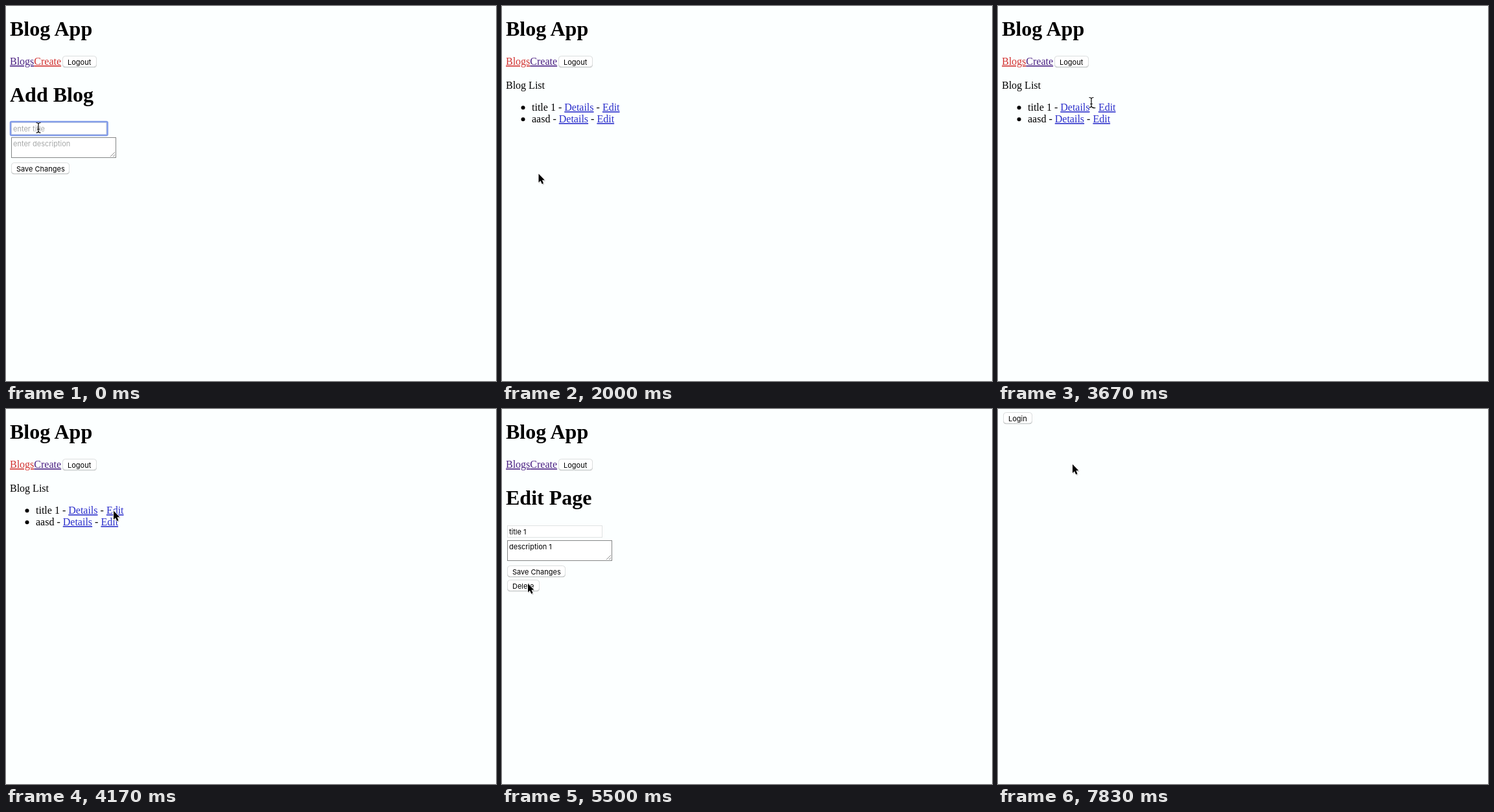
Recreate the animation shown at these times as an HTML page. Size 756 by 580 pixels, loop 8 s.

```html
<!DOCTYPE html>
<html lang="en">
<head>
<meta charset="utf-8">
<title>Blog App</title>
<style>
  html, body { margin: 0; width: 100%; height: 100%; overflow: hidden; background: #fcffff; }
  svg { display: block; width: 756px; height: 580px; }
  text { font: 16px "Liberation Serif", Times, serif; fill: #000; white-space: pre; }
  .h1 { font-size: 32px; font-weight: bold; }
  .ui { font: 11px Inter, sans-serif; }
  .hint { fill: #a6a8a8; }
  .link { text-decoration: underline; }
  .visited { fill: #4b2183; }
  .active { fill: #d23230; }
  .fresh { fill: #2b2fcb; }
  .field { fill: #fff; stroke: #dfe2e2; }
  .area { fill: #fff; stroke: #858787; }
  .ring { fill: none; stroke: #829be8; stroke-width: 2.6; }
  .thin { fill: none; stroke: #777; stroke-width: .8; }
</style>
</head>
<body>
<svg id="stage" viewBox="0 0 756 580"></svg>
<script>
const LOOP = 8000, STEP = 1000 / 6;
const stage = document.getElementById('stage');

const text = (x, y, s, cls = '') => `<text x="${x}" y="${y}" class="${cls}">${s}</text>`;
const rect = (x, y, w, h, cls, r = 0) =>
  `<rect x="${x}" y="${y}" width="${w}" height="${h}" rx="${r}" class="${cls}"/>`;
const span = (s, cls) => `<tspan class="link ${cls}">${s}</tspan>`;

function button(x, y, w, label) {
  return `<rect x="${x}" y="${y + .8}" width="${w}" height="17.4" rx="4.5" fill="#b9bcbc"/>
    <rect x="${x + .5}" y="${y + .5}" width="${w - 1}" height="16.6" rx="4" fill="#fff" stroke="#dcdfdf"/>` +
    text(x + 8, y + 14, label, 'ui');
}

function header(tab) {
  const tone = name => name === tab ? 'active' : 'visited';
  return text(6, 46, 'Blog App', 'h1') +
    text(6, 91, span('Blogs', tone('blogs')) + span('Create', tone('create'))) +
    button(87, 77, 53, 'Logout');
}

const caret = (x, y) => `<path d="M${x} ${y}v12" stroke="#000"/>`;

function form(heading, title, body, focus) {
  let s = text(6, 148, heading, 'h1') +
    rect(8.5, 180.5, 146, 18, 'field') +
    rect(8.5, 203.5, 161, 31, 'area') +
    '<path class="thin" d="M161 233l7-7M165 233l3-3"/>' +
    text(11, 194, title || 'enter title', title ? 'ui' : 'ui hint') +
    text(11, 217, body || 'enter description', body ? 'ui' : 'ui hint') +
    button(8, 242, 90, 'Save Changes');
  if (focus === 'title') s += rect(7, 179, 149.5, 21, 'ring', 1.5);
  if (focus === 'body') s += rect(7, 202, 164, 34, 'ring', 1.5);
  return s;
}

function addPage(n) {
  const title = 'aasd'.slice(0, n), body = 'asd'.slice(0, Math.max(0, n - 5));
  const inTitle = n < 5;
  let s = header('create') + form('Add Blog', title, body, inTitle ? 'title' : 'body');
  const widths = { a: 6.2, s: 5.8, d: 6.8 };
  const end = [...(inTitle ? title : body)].reduce((x, c) => x + widths[c], 11.7);
  if (n > 0) s += caret(end, inTitle ? 184 : 207);
  if (!inTitle) s += '<path d="M11 196.5h25" stroke="#c4625c" stroke-dasharray="1.2 1.2"/>';
  return s;
}

const editPage = () =>
  header() + form('Edit Page', 'title 1', 'description 1') + button(8, 264, 50, 'Delete');

const listPage = items => header('blogs') + text(6, 128, 'Blog List') +
  items.map((name, i) => `<circle cx="32.5" cy="${157.3 + 18 * i}" r="3"/>` +
    text(46, 162 + 18 * i, `${name} - ${span('Details', 'fresh')} - ${span('Edit', 'fresh')}`)).join('');

const loginPage = () => button(8, 5, 45, 'Login');

// [first step, page]
const pages = [
  [0, addPage],
  [12, () => listPage(['title 1', 'aasd'])],
  [26, editPage],
  [34, () => listPage(['title 1', 'aasd'])],
  [35, () => listPage(['aasd'])],
  [43, loginPage]
];

// [step, x, y, shape until the next entry]
const path = [
  [0, 50, 188, 'beam'], [1, 50, 188, ''],
  [9, 52, 216, 'beam'], [10, 58, 246, 'arrow'], [11, 56, 258, 'arrow'],
  [13, 57, 261, 'arrow'], [14, 60, 256, 'arrow'], [15, 70, 215, 'arrow'],
  [16, 84, 160, 'beam'], [22, 144, 149, 'beam'],
  [23, 184, 160, 'arrow'], [24, 167, 157, 'arrow'], [26, 165, 158, 'arrow'],
  [27, 120, 200, 'arrow'], [28, 64, 246, 'arrow'], [29, 55, 252.5, 'arrow'],
  [31, 52, 275, 'arrow'], [33, 40, 270, 'arrow'], [36, 42, 266, 'arrow'],
  [37, 70, 170, 'arrow'], [38, 99, 75.5, 'arrow'], [41, 115, 85.5, 'arrow']
];

const shapes = {
  '': '',
  beam: `<path d="M-3.5-7.5Q0-7.5 0-5V5.5Q0 8-3.5 8M3.5-7.5Q0-7.5 0-5V5.5Q0 8 3.5 8M-1.8 2.5H1.8"
    fill="none" stroke="#000" stroke-width="1.2"/>`,
  arrow: `<path d="M1 1.5V15l3-2.6L6 17.5l2.8-1-2.2-5.1h4.2Z" fill="#000" opacity=".22"/>
    <path d="M0 0V13.5L3 10.8L5.2 15.8L7.6 14.8L5.4 9.8H9.4Z" fill="#000" stroke="#fff"
      stroke-width="1.6" paint-order="stroke"/>`
};

const latest = (table, n) => table.findLastIndex(row => row[0] <= n);

function pointer(n) {
  const i = latest(path, n);
  const [start, x, y, shape] = path[i];
  const [end, nx, ny] = path[i + 1] || [start + 1, x, y];
  const k = (n - start) / (end - start);
  const px = x + (nx - x) * k, py = y + (ny - y) * k;
  return `<g transform="translate(${px} ${py})">${shapes[shape]}</g>`;
}

let shown = -1;
function draw(now) {
  const n = Math.floor(((now % LOOP) + 5) / STEP) % 48;
  if (n !== shown) {
    shown = n;
    stage.innerHTML = pages[latest(pages, n)][1](Math.min(n, 8)) + pointer(n);
  }
}

const begin = performance.now();
function tick() {
  draw(performance.now() - begin);
  requestAnimationFrame(tick);
}
tick();
</script>
</body>
</html>
```
